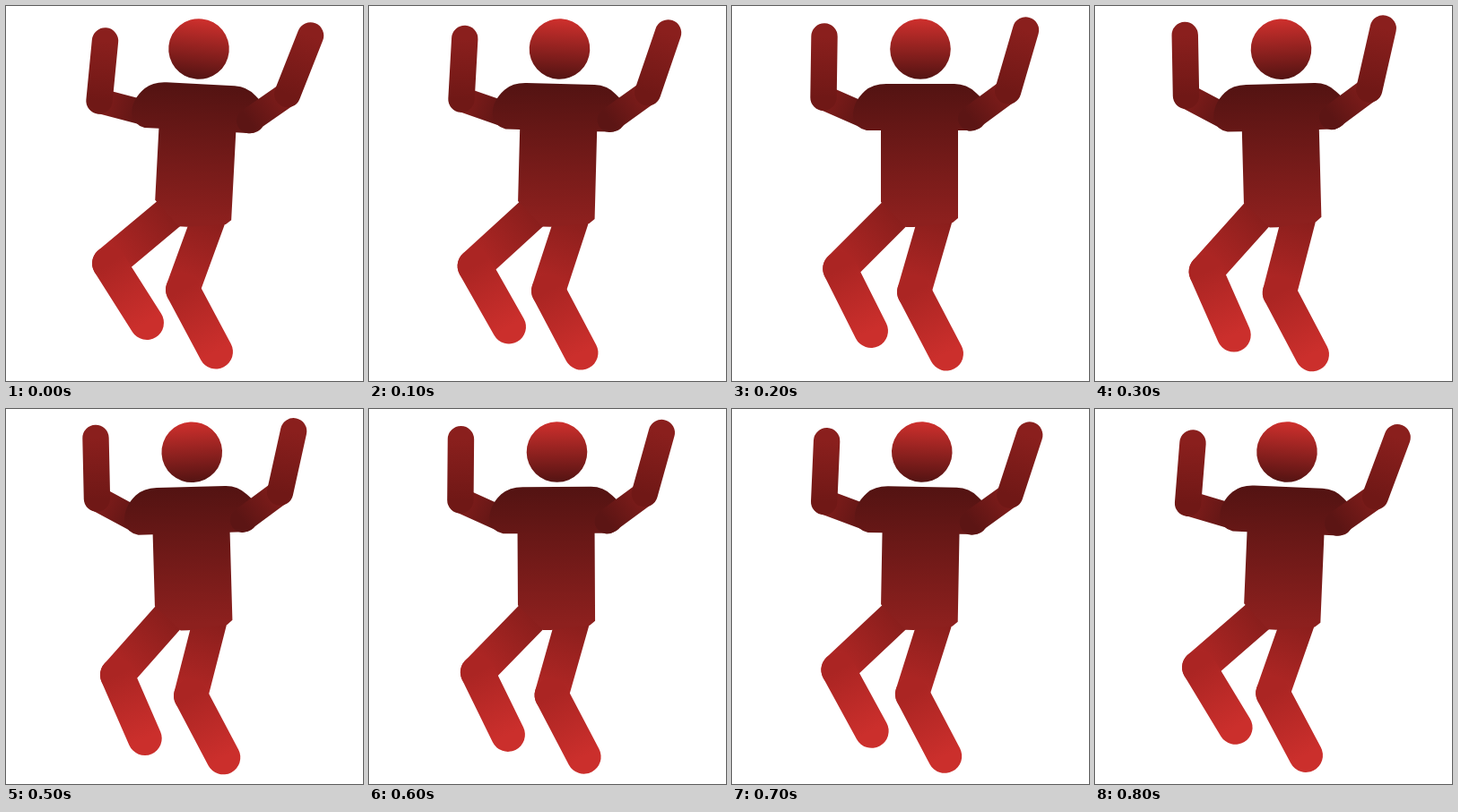
An HTML page with a canvas that plays this animation: 398 px wide and 419 px high, repeating every 900 ms.

```html
<!DOCTYPE html>
<html>
<head>
<meta charset="utf-8">
<style>
html, body { margin: 0; width: 100%; height: 100%; overflow: hidden; background: #fff; }
canvas { display: block; }
</style>
</head>
<body>
<canvas id="stage" width="398" height="419"></canvas>
<script>
const ctx = document.getElementById('stage').getContext('2d');
const STEP_MS = 100, STEPS = 9;

// Each joint has a position for leaning right, upright and leaning left.
const joints = {
  head:      [[215, 48], [210, 48], [205, 48.5]],
  shoulderL: [[155.3, 119.5], [150.4, 123.5], [146, 126.6]],
  elbowL:    [[104, 106], [102, 102.3], [101, 98.3]],
  handL:     [[110.5, 39], [103, 34], [97.5, 31]],
  shoulderR: [[271, 128.3], [266, 125.8], [262, 122.5]],
  elbowR:    [[313.7, 98.5], [307.7, 95], [303.8, 91.5]],
  handR:     [[339.5, 33], [327.5, 27], [315, 23]],
  hipL:      [[182, 231.5], [182, 231.5], [182, 231.5]],
  kneeL:     [[115, 287.6], [120.2, 293.5], [127, 300]],
  footL:     [[157, 354], [155, 363], [154.5, 372]],
  hipR:      [[228, 232], [227.7, 234], [228.5, 234]],
  kneeR:     [[197, 317], [203, 319.5], [208.5, 321.3]],
  footR:     [[234, 386.5], [239, 388.5], [245, 390]]
};

const torso = new Path2D(
  'M166 219V139H150Q137 136 135 124Q134 108 148 95Q157 87 172 87' +
  'H248Q262 87 272 97Q280 104 284 112Q286 138 268 139H252V237L246 242L203 247H194Z');

const DARK = '#531312', MID = '#8d201e', RED = '#cf302d';

function gradient(from, to, ...colors) {
  const g = ctx.createLinearGradient(...from, ...to);
  colors.forEach((c, i) => g.addColorStop(i / (colors.length - 1), c));
  return g;
}

function limb(from, to, radius, startColor, endColor) {
  ctx.strokeStyle = gradient(from, to, startColor, endColor);
  ctx.lineWidth = radius * 2;
  ctx.lineCap = 'round';
  ctx.beginPath();
  ctx.moveTo(...from);
  ctx.lineTo(...to);
  ctx.stroke();
}

function rotated(x, y, degrees, paint) {
  ctx.save();
  ctx.translate(x, y);
  ctx.rotate(degrees * Math.PI / 180);
  ctx.translate(-x, -y);
  paint();
  ctx.restore();
}

function poseAt(lean) {
  const half = lean < 0.5 ? 0 : 1, k = lean * 2 - half;
  const pose = {};
  for (const name in joints) {
    const a = joints[name][half], b = joints[name][half + 1];
    pose[name] = a.map((v, i) => v + (b[i] - v) * k);
  }
  return pose;
}

function arm(shoulder, elbow, hand) {
  limb(shoulder, elbow, 14, '#5c1514', '#821d1b');
  limb(elbow, hand, 14.7, '#701816', '#8a1f1d');
}

function leg(hip, knee, foot) {
  limb(hip, knee, 19, '#891e1c', '#b32725');
  limb(knee, foot, 19, '#ab2523', '#cb2f2c');
}

function draw(lean) {
  const p = poseAt(lean), tilt = 3 - 6 * lean;
  ctx.fillStyle = '#fff';
  ctx.fillRect(0, 0, 398, 419);

  leg(p.hipL, p.kneeL, p.footL);
  leg(p.hipR, p.kneeR, p.footR);
  arm(p.shoulderL, p.elbowL, p.handL);

  rotated(209, 222, tilt, () => {
    ctx.fillStyle = gradient([0, 87], [0, 240], DARK, MID);
    ctx.fill(torso);
  });

  arm(p.shoulderR, p.elbowR, p.handR);

  const [x, y] = p.head;
  rotated(x, y, tilt * 2, () => {
    ctx.fillStyle = gradient([x, y - 34], [x, y + 34], RED, DARK);
    ctx.beginPath();
    ctx.arc(x, y, 33.8, 0, Math.PI * 2);
    ctx.fill();
  });
}

function tick() {
  const step = Math.floor(performance.now() / STEP_MS) % STEPS;
  draw(step <= 4 ? step / 4 : 1 - (step - 4) * 0.225);
  requestAnimationFrame(tick);
}
tick();
</script>
</body>
</html>
```
